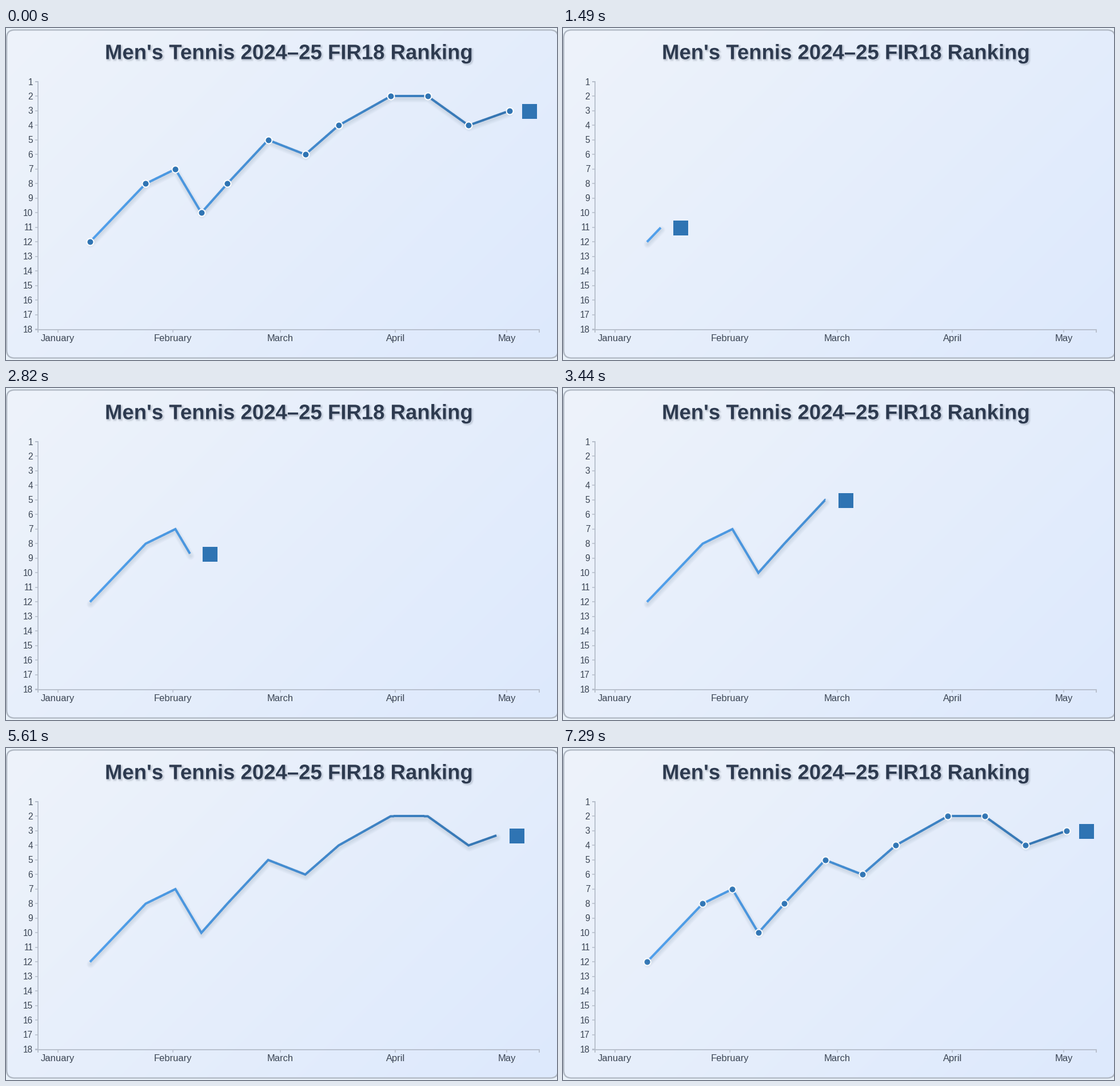
These frames come from a looping animation (964 px wide and 581 px high, 7.35 s). A matplotlib script:

```python
import numpy as np
import matplotlib.pyplot as plt
from matplotlib import patheffects as pe
from matplotlib.animation import FuncAnimation
from matplotlib.collections import LineCollection
from matplotlib.patches import FancyBboxPatch, Rectangle

W, H, DPI = 964, 581, 64
FRAMES, STEP = 105, 70
DRAW_START, DRAW_TIME = 40, 6825
FADE_START, FADE_TIME = 6900, 500

INK, LABEL, AXIS, BLUE = "#2d3a4f", "#3a4453", "#b5bdca", "#2f74b3"
LINE_COLORS = np.array([[80, 160, 236], [52, 116, 176]]) / 255
CARD_COLORS = np.array([[238, 243, 250], [221, 233, 253]]) / 255

LEFT, BASE = 56, 527.5
MONTH_DAYS = {"January": 31, "February": 29, "March": 31, "April": 30, "May": 31}
FIRST_DAY = 8.7
GAPS = [15, 8, 7, 7, 11, 10, 9, 14, 10, 11, 11]
RANKS = [12, 8, 7, 10, 8, 5, 6, 4, 2, 2, 4, 3]


def px(v):
    """Pixels to points."""
    return v * 72 / DPI


def day_x(day):
    return 90.5 + 6.493 * day


def rank_y(rank):
    return 94 + (rank - 1) * 25.49


def ease(u):
    """Cubic ease in and out."""
    u = np.clip(u, 0, 1)
    return 4 * u**3 if u < 0.5 else 1 - 4 * (1 - u) ** 3


def blend(colors, u):
    return colors[0] + (colors[1] - colors[0]) * u


days = FIRST_DAY + np.r_[0, np.cumsum(GAPS)]
pts = np.column_stack([day_x(days), rank_y(np.array(RANKS))])
cum = np.r_[0, np.cumsum(np.hypot(*np.diff(pts, axis=0).T))]

# Chunk borders stay clear of the corners so each corner gets a clean join.
cuts = np.concatenate([np.linspace(a + 6, b - 6, 7) for a, b in zip(cum, cum[1:])])
cuts[0], cuts[-1] = 0, cum[-1]


def at(s):
    return np.array([np.interp(s, cum, axis) for axis in pts.T])


def stretch(a, b):
    """Part of the path between lengths a and b, corners included."""
    inner = pts[(cum > a + 0.01) & (cum < b - 0.01)]
    return np.vstack([at(a), inner, at(b)])


fig = plt.figure(figsize=(W / DPI, H / DPI), dpi=DPI, facecolor="#e9f1f9")
ax = fig.add_axes([0, 0, 1, 1])
ax.set_xlim(0, W)
ax.set_ylim(H, 0)
ax.axis("off")


def round_box(inset, color):
    box = FancyBboxPatch((inset, 2.3 + inset), 967 - 2 * inset, 576.4 - 2 * inset,
                         boxstyle=f"round,pad=0,rounding_size={15 - inset}",
                         fc=color, ec="none", zorder=0)
    return ax.add_patch(box)


def draw_card():
    round_box(0, "#b0b8c3")
    yy, xx = np.mgrid[0:H, 0:W]
    fill = blend(CARD_COLORS, ((xx + yy) / (W + H))[..., None])
    img = ax.imshow(fill, extent=(0, W, H, 0), aspect="auto",
                    interpolation="nearest", zorder=1)
    img.set_clip_path(round_box(2.3, "none"))


def rule(xs, ys, width):
    ax.plot(xs, ys, color=AXIS, lw=px(width), solid_capstyle="butt",
            solid_joinstyle="miter", zorder=2)


def label(x, y, text, size, **kw):
    style = dict(color=LABEL, family="Liberation Sans", va="baseline", zorder=3)
    return ax.text(x, y, text, fontsize=px(size), **{**style, **kw})


def draw_axes():
    top, right, tick = rank_y(1), 932.5, 5.5
    rule([LEFT - tick, LEFT, LEFT, LEFT - tick], [top, top, BASE, BASE], 1.8)
    rule([LEFT, LEFT, right, right], [BASE + tick, BASE, BASE, BASE + tick], 1.8)
    for rank in range(1, 19):
        y = rank_y(rank)
        rule([LEFT - tick, LEFT], [y, y], 1.5)
        label(47.3, y + 5.5, str(rank), 15.5, ha="right")
    day = 0
    for name, length in MONTH_DAYS.items():
        x = day_x(day)
        rule([x, x], [BASE, BASE + tick], 1.5)
        label(x, 548.3, name, 16.5, ha="center")
        day += length


def draw_title():
    title = label(494.3, 54.5, "Men's Tennis 2024–25 FIR18 Ranking", 36.55,
                  ha="center", color=INK, weight="bold")
    blur = [pe.Stroke(offset=(px(2), -px(2)), linewidth=px(w), foreground=INK, alpha=0.02)
            for w in range(1, 6)]
    title.set_path_effects(blur + [pe.Normal()])


draw_card()
draw_axes()
draw_title()

shadows = [ax.plot([], [], color="#1c2c48", alpha=0.017, lw=px(w), zorder=4,
                   solid_capstyle="round", solid_joinstyle="round")[0]
           for w in range(2, 15, 2)]
line = LineCollection([], linewidths=px(4), capstyle="butt", joinstyle="miter", zorder=5)
ax.add_collection(line)
badge = ax.add_patch(Rectangle((0, 0), 26, 26, fc=BLUE, ec="none", zorder=6))
dots, = ax.plot(*pts.T, "o", ms=px(12), mfc=BLUE, mec="white", mew=px(2), zorder=7)


def draw(k):
    t = (k or FRAMES) * STEP  # the loop opens on its finished pose
    s = ease((t - DRAW_START) / DRAW_TIME) * cum[-1]
    fade = ease((t - FADE_START) / FADE_TIME)

    parts = [stretch(max(a - 0.8, 0), min(b, s)) for a, b in zip(cuts, cuts[1:]) if a < s]
    line.set_segments(parts)
    line.set_color([blend(LINE_COLORS, (p[:, 0].mean() - pts[0, 0]) / np.ptp(pts[:, 0]))
                    for p in parts])

    trail = stretch(0, s) + [1, 4]
    for shadow in shadows:
        shadow.set_data(*trail.T)
        shadow.set_visible(s > 0.5)

    badge.set_xy(at(s) + [22.5, -12])
    dots.set_alpha(fade)
    return [*shadows, line, badge, dots]


anim = FuncAnimation(fig, draw, frames=FRAMES, interval=STEP, repeat=True,
                     repeat_delay=0, blit=False)
plt.show()
```
